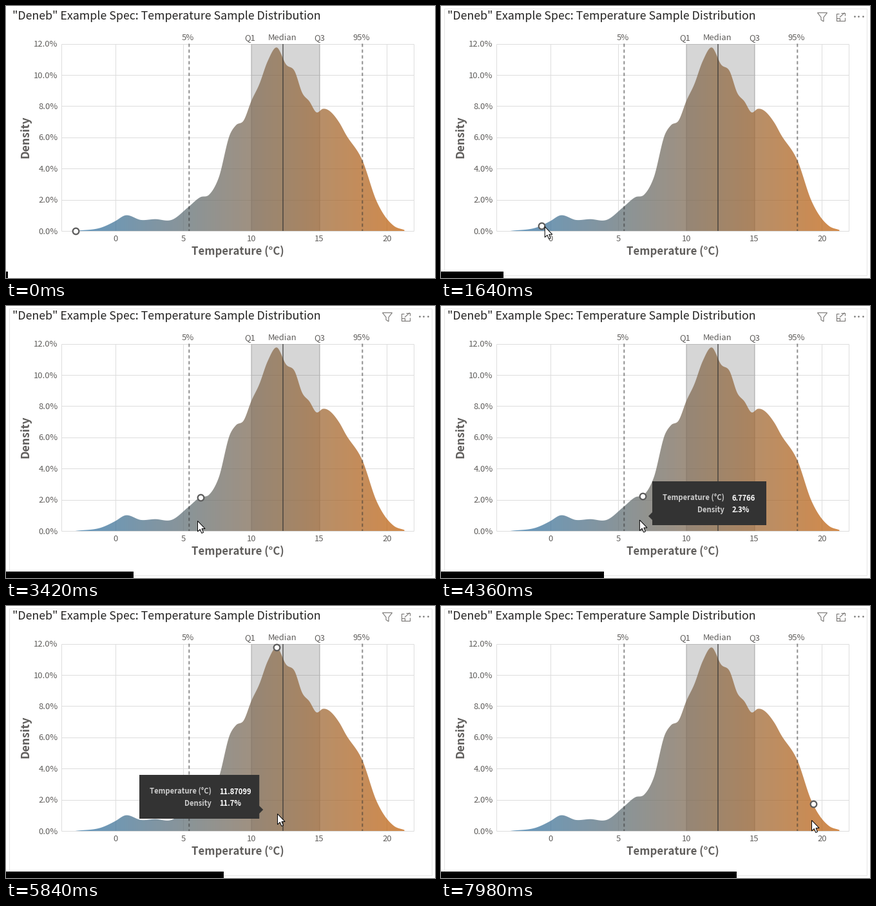
Animation of 666 by 422 pixels, one loop 8 s. Source, as a matplotlib script:

```python
import numpy as np
import matplotlib.pyplot as plt
from matplotlib.animation import FuncAnimation
from matplotlib.patches import Polygon, Rectangle

W, H = 666, 422
STEP, LOOP = 40, 8000
X0, X_UNIT = 170, 21.07      # pixel of 0 degrees, pixels per degree
Y0, Y_UNIT = 349, 24.2       # pixel of 0 %, pixels per percent
LEFT, RIGHT, TOP = 86, 633, 58.5
GREY, GRID = "#605e5c", "#dddddd"
COLD, WARM = np.array([49, 119, 171]), np.array([197, 100, 14])

plt.rcParams["font.family"] = ["Noto Sans CJK JP", "DejaVu Sans"]
plt.rcParams["toolbar"] = "None"

fig = plt.figure(figsize=(W / 72, H / 72), dpi=72, facecolor="white")
ax = fig.add_axes([0, 0, 1, 1])
ax.axis("off")

# Bends of the density curve, in pixels
BENDS = np.array([
    (107.5, 349), (150, 343), (170, 333.5), (184.5, 325), (210, 332),
    (231, 330.7), (258, 331.5), (283, 312), (302, 296.5), (315, 293),
    (330, 267), (348, 198.5), (357, 185), (369, 177.5), (381, 147),
    (393, 122), (406.5, 85), (420, 64.3), (435, 91), (448, 101),
    (460, 135), (471, 148), (482, 165), (492, 159.5), (517.5, 181),
    (527.5, 199), (553.5, 240), (575, 302), (602, 341), (618.5, 347.5)])


def density_y(x):
    """Cubic Hermite curve through the bends."""
    px, py = BENDS.T
    slope = np.gradient(py, px)
    x = np.clip(x, px[0], px[-1])
    i = np.clip(np.searchsorted(px, x) - 1, 0, len(px) - 2)
    h = px[i + 1] - px[i]
    u = (x - px[i]) / h
    return ((1 + 2 * u) * (1 - u) ** 2 * py[i] + u * (1 - u) ** 2 * h * slope[i]
            + u * u * (3 - 2 * u) * py[i + 1] + u * u * (u - 1) * h * slope[i + 1])


def line(xs, ys, color, width=1, **kw):
    return ax.plot(xs, ys, color=color, lw=width, solid_capstyle="butt",
                   dash_capstyle="butt", **kw)[0]


def label(x, y, s, size=13, color=GREY, ha="center", **kw):
    return ax.text(x, y, s, fontsize=size, color=color, ha=ha,
                   va="baseline", **kw)


def draw_axes():
    for temp in range(0, 21, 5):
        x = X0 + temp * X_UNIT
        line([x, x], [TOP, Y0], GRID, zorder=1)
        label(x, 365, str(temp))
    for pct in range(0, 13, 2):
        y = Y0 - pct * Y_UNIT
        line([LEFT, RIGHT], [y, y], GRID, zorder=1)
        label(80.5, y + 4.7, f"{pct:.1f}%", ha="right")
    for x in (LEFT, RIGHT):
        line([x, x], [TOP, Y0], GRID, zorder=1)
    label(359.5, 386.5, "Temperature (°C)", 16.8, weight="bold")
    label(35.5, 203.5, "Density", 17.6, weight="bold", rotation=90,
          rotation_mode="anchor")
    label(10, 21, '"Deneb" Example Spec: Temperature Sample Distribution',
          17.85, "#252423", ha="left")


def draw_density():
    xs = np.linspace(BENDS[0, 0], BENDS[-1, 0], 700)
    shape = Polygon([(xs[0], Y0), *zip(xs, density_y(xs)), (xs[-1], Y0)],
                    closed=True, fc="none", ec="none")
    ax.add_patch(shape)
    ramp = COLD + np.linspace(0, 1, 512)[:, None] * (WARM - COLD)
    img = ax.imshow(ramp[None] / 255, extent=(xs[0], xs[-1], Y0 + 1, TOP),
                    aspect="auto", interpolation="nearest", alpha=0.75, zorder=2)
    img.set_clip_path(shape)


def draw_quantiles():
    ax.add_patch(Rectangle((380, TOP), 108, Y0 - TOP, fc="black", ec="none",
                           alpha=0.16, zorder=1.5))
    for x, name in ((284, "5%"), (380, "Q1"), (430.3, "Median"),
                    (488, "Q3"), (553, "95%")):
        label(x - 1.5, 53, name)
        if name == "Median":
            line([x, x], [TOP, Y0], "#333333", 2, alpha=0.6, zorder=4)
        elif "%" in name:
            line([x + 0.3, x + 0.3], [TOP, Y0], "#333333", 2, alpha=0.55,
                 zorder=4, dashes=(2.5, 2), snap=False)


def draw_header():
    """Border and icons that show while the pointer is over the chart."""
    ink = "#777573"
    frame = Rectangle((4.5, 3.5), 656, 414, fc="none", ec="#e6e6e6", lw=1)
    funnel = Polygon([(584.5, 10.5), (599.5, 10.5), (594, 17.5), (594, 24),
                      (590, 21.5), (590, 17.5)], fc="none", ec=ink, lw=1.1)
    return [
        ax.add_patch(frame), ax.add_patch(funnel),
        line([618, 613.5, 613.5, 626.5, 626.5], [11.5, 11.5, 22.5, 22.5, 18], ink, 1.1),
        line([621, 626.5, 626.5], [10.5, 10.5, 15], ink, 1.1),
        line([619, 626.5], [17.5, 10.5], ink, 1.1),
        line([613.5, 618.5, 618.5], [18.5, 18.5, 22.5], ink, 1.1),
        ax.plot([641.5, 648, 654.5], [16] * 3, "o", ms=2.6, mew=0, color=ink)[0],
    ]


draw_axes()
draw_density()
draw_quantiles()
header = draw_header()
marker, = ax.plot([], [], "o", ms=9.6, mfc="white", mec="#5a5a5a", mew=2.2, zorder=6)

tip_box = ax.add_patch(Polygon([(0, 0)], closed=True, fc="#333333", ec="none", zorder=7))
tip_text = [label(0, 0, s, 11.2, c, ha=ha, weight="bold", zorder=8)
            for s, c, ha in (("Temperature (°C)", "#cccccc", "right"),
                             ("Density", "#cccccc", "right"),
                             ("", "white", "left"), ("", "white", "left"))]

ARROW = np.array([(0, 0), (0, 16.5), (3.8, 13), (6.3, 19), (9, 17.8),
                  (6.5, 12), (11.6, 12)])
pointer = ax.add_patch(Polygon(ARROW, closed=True, fc="white", ec="black",
                               lw=1, zorder=9))
bar = ax.add_patch(Rectangle((0, 412), 0, 10, fc="black", ec="none", zorder=10))
ax.set_xlim(0, W)
ax.set_ylim(H, 0)

# Time, pointer x and y, marker x
STOPS = np.array([
    (40, 20, 388, 107.5), (700, 119, 354, 107.5), (900, 121, 354, 107.5),
    (2000, 180, 336, 179), (2600, 181, 336, 179), (3400, 297, 333, 302),
    (4060, 306, 332, 312.5), (4700, 310, 331, 312.5), (4920, 355, 328, 352.5),
    (5500, 421, 322, 419.5), (6600, 421, 322, 419.5), (7400, 539, 330, 536),
    (7960, 575, 332, 577.5)]).T
# Temperature, density, side of the notch, start, end
TIPS = [("0.46926", "0.9%", "left", 1840, 2800),
        ("6.7766", "2.3%", "left", 4260, 5010),
        ("11.87099", "11.7%", "right", 5720, 6780)]
FADE_IN, FADE_OUT, LAG = 100, 180, 75


def pose(t):
    return [np.interp(t, STOPS[0], track) for track in STOPS[1:]]


def text_width(s):
    return sum({"1": 4.6, ".": 3.3}.get(c, 6.75) for c in s)


def update_tip(t):
    shown = [tip for tip in TIPS if tip[3] < t < tip[4]]
    for artist in (tip_box, *tip_text):
        artist.set_visible(bool(shown))
    if not shown:
        return
    temp, dens, side, start, end = shown[0]
    x, y, _ = pose(t - LAG)
    width, top = 140 + text_width(temp), round(y) - 60
    left = round(x + 21 if side == "left" else x - 28 - width)
    right = left + width
    box = [(left, top), (right, top), (right, top + 68), (left, top + 68)]
    if side == "left":
        box += [(left, top + 60), (left - 6, top + 54), (left, top + 48)]
    else:
        box[2:2] = [(right, top + 48), (right + 6, top + 54), (right, top + 60)]
    tip_box.set_xy(box)
    tip_text[2].set_text(temp)
    tip_text[3].set_text(dens)
    for k, s in enumerate(tip_text):
        s.set_position((left + (112 if k < 2 else 124), top + (48 if k % 2 else 29.5)))
    alpha = min((t - start) / FADE_IN, (end - t) / FADE_OUT, 1)
    for artist in (tip_box, *tip_text):
        artist.set_alpha(alpha)


def update(i):
    t = i * STEP
    for artist in (*header, pointer):
        artist.set_visible(t > 0)
    px, py, mx = pose(t)
    pointer.set_xy(ARROW + (px + 0.5, py + 0.5))
    marker.set_data([mx + 0.2], [density_y(mx)])
    update_tip(t)
    bar.set_width(3 + 0.0573 * t)
    return []


anim = FuncAnimation(fig, update, frames=LOOP // STEP, interval=STEP,
                     init_func=lambda: update(0), repeat=True, repeat_delay=0)
plt.show()
```
